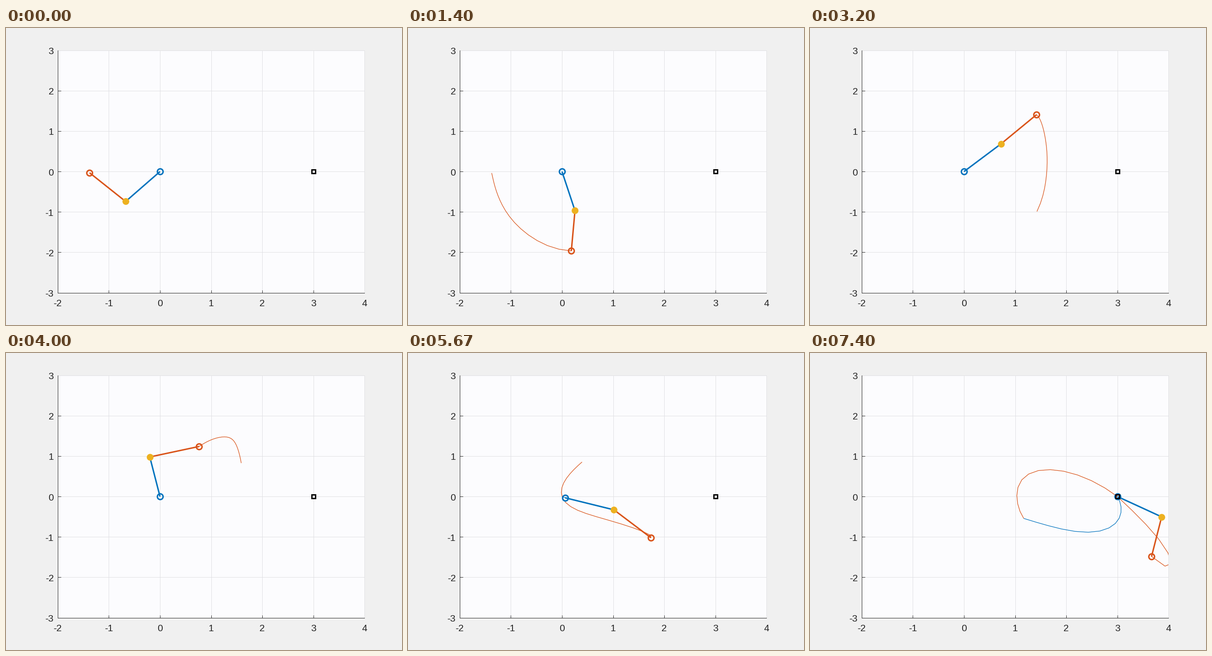
A matplotlib script that plays this animation: 864 px wide and 648 px high, repeating every 7.47 s.

```python
import numpy as np
import matplotlib.pyplot as plt
from matplotlib.animation import FuncAnimation

LOOP_MS, TICK_MS, STEPS_PER_S = 7470, 30, 15
POSES, TAIL = 112, 20
RELEASE, CATCH = 84, 104
GOAL = np.array([3, 0])
GRAVITY = .0062  # units per squared step

BLUE, ORANGE, GOLD = "#0072BD", "#D95319", "#EDB120"
INK, GRID = "#262626", "#E0E0E3"
PX = 72 / 150  # one pixel in points

# step, elbow bend, direction of the arm's bisector (degrees)
KEYS = np.array([
    (0, -93, -178.7), (8, -94, -163), (14, -81.6, -132.7),
    (18, -54.6, -105.8), (21, -18.8, -84.7), (26, 44, -49.1),
    (30, 68.6, -21), (36, 67.5, 12.2), (44, 30.6, 38.1), (52, -27.5, 49.5),
    (60, -86.4, 58.3), (68, -146, 74.5), (72, -174.5, 98),
    (75, -197.4, 124.4), (79, -244.7, 147.1), (84, -360, 150.4),
    (91, -540, 141), (94, -614, 136.6), (98, -736, 134.2),
    (104, -900, 130.5), (108, -1017.5, 125.3), (111, -1151.2, 114.2),
])


def spline(t, x, y):
    """Cubic spline that starts at rest and ends free."""
    h, slope = np.diff(x), np.diff(y) / np.diff(x)
    a, b = np.eye(len(x)), np.zeros(len(x))
    a[0, :2], b[0] = (2 * h[0], h[0]), 6 * slope[0]
    for i in range(1, len(x) - 1):
        a[i, i - 1:i + 2] = h[i - 1], 2 * (h[i - 1] + h[i]), h[i]
        b[i] = 6 * (slope[i] - slope[i - 1])
    m = np.linalg.solve(a, b)
    i = np.clip(np.searchsorted(x, t, side="right") - 1, 0, len(h) - 1)
    p, q, d = x[i + 1] - t, t - x[i], h[i]
    return ((m[i] * p**3 + m[i + 1] * q**3) / (6 * d)
            + (y[i] / d - m[i] * d / 6) * p
            + (y[i + 1] / d - m[i + 1] * d / 6) * q)


def unit(angle):
    return np.column_stack((np.cos(angle), np.sin(angle)))


def swing():
    """Paths of the blue grip, the elbow and the orange hand."""
    t = np.arange(POSES)
    bend, mid = (np.radians(spline(t, KEYS[:, 0], KEYS[:, k])) for k in (1, 2))
    upper, lower = unit(mid - bend / 2), unit(mid + bend / 2)
    centre = .75 * upper + .25 * lower

    # between release and catch the centre of mass flies on a parabola
    s = np.clip(t - RELEASE, 0, CATCH - RELEASE)[:, None]
    span = CATCH - RELEASE
    start, end = centre[RELEASE], GOAL + centre[CATCH]
    mass = start + (end - start) * s / span
    mass[:, 1:] += GRAVITY / 2 * s * (span - s)
    grip = mass - centre
    grip[:RELEASE + 1] = 0
    grip[CATCH:] = GOAL
    return grip, grip + upper, grip + upper + lower


grip, elbow, hand = swing()

fig = plt.figure(figsize=(5.76, 4.32), dpi=150, facecolor="#F0F0F0")
ax = fig.add_axes([112.8 / 864, 70.4 / 648, 669.6 / 864, 528.8 / 648],
                  facecolor="#FCFCFE")
ax.set(xlim=(-2, 4), ylim=(-3, 3), xticks=range(-2, 5), yticks=range(-3, 4))
ax.set_axisbelow(True)
ax.grid(color=GRID, lw=PX)
ax.tick_params(direction="in", length=6.5 * PX, width=PX, color=INK,
               labelbottom=False, labelleft=False)
for side, spine in ax.spines.items():
    near = side in ("left", "bottom")
    spine.set(color=INK if near else GRID, linewidth=PX,
              zorder=2.5 if near else .6)


def label(value, xy, offset, ha):
    ax.annotate(str(value), xy, offset, textcoords="offset points", ha=ha,
                va="baseline", color=INK, family="Liberation Sans", size=10)


for v in range(-2, 5):
    label(v, (v, -3), (0, -13.9), "center")
for v in range(-3, 4):
    label(v, (-2, v), (-4.2, -4), "right")


def line(color, width, z):
    return ax.plot([], [], color=color, lw=width, zorder=z,
                   solid_capstyle="butt", solid_joinstyle="round")[0]


def dot(color, z, marker="o", size=6, fill="none", edge=1.5):
    return ax.plot([], [], marker, ms=size, mec=color, mfc=fill, mew=edge,
                   zorder=z, clip_on=False)[0]


trails = [(line(BLUE, .6, 3), grip), (line(ORANGE, .6, 3.1), hand)]
links = [(line(BLUE, 1.5, 4), grip, elbow), (line(ORANGE, 1.5, 4.1), elbow, hand)]
dots = [(dot(BLUE, 5), grip), (dot(ORANGE, 5.1), hand),
        (dot(GOLD, 5.2, fill=GOLD, edge=1.1), elbow)]
dot("black", 6, "s", 4.3, edge=1.4).set_data([GOAL[0]], [GOAL[1]])


def update(tick):
    ms = tick * TICK_MS + 20
    n = ms * STEPS_PER_S // 1000
    for art, path in trails:
        art.set_data(*path[max(0, n - TAIL):n + 1].T)
    for art, a, b in links:
        art.set_data([a[n, 0], b[n, 0]], [a[n, 1], b[n, 1]])
    for art, path in dots:
        art.set_data(path[n:n + 1, 0], path[n:n + 1, 1])
        art.set_visible(path[n, 0] <= 4)
    return [item[0] for item in trails + links + dots]


anim = FuncAnimation(fig, update, frames=LOOP_MS // TICK_MS,
                     init_func=lambda: update(0), interval=TICK_MS,
                     repeat=True, repeat_delay=0)
plt.show()
```
